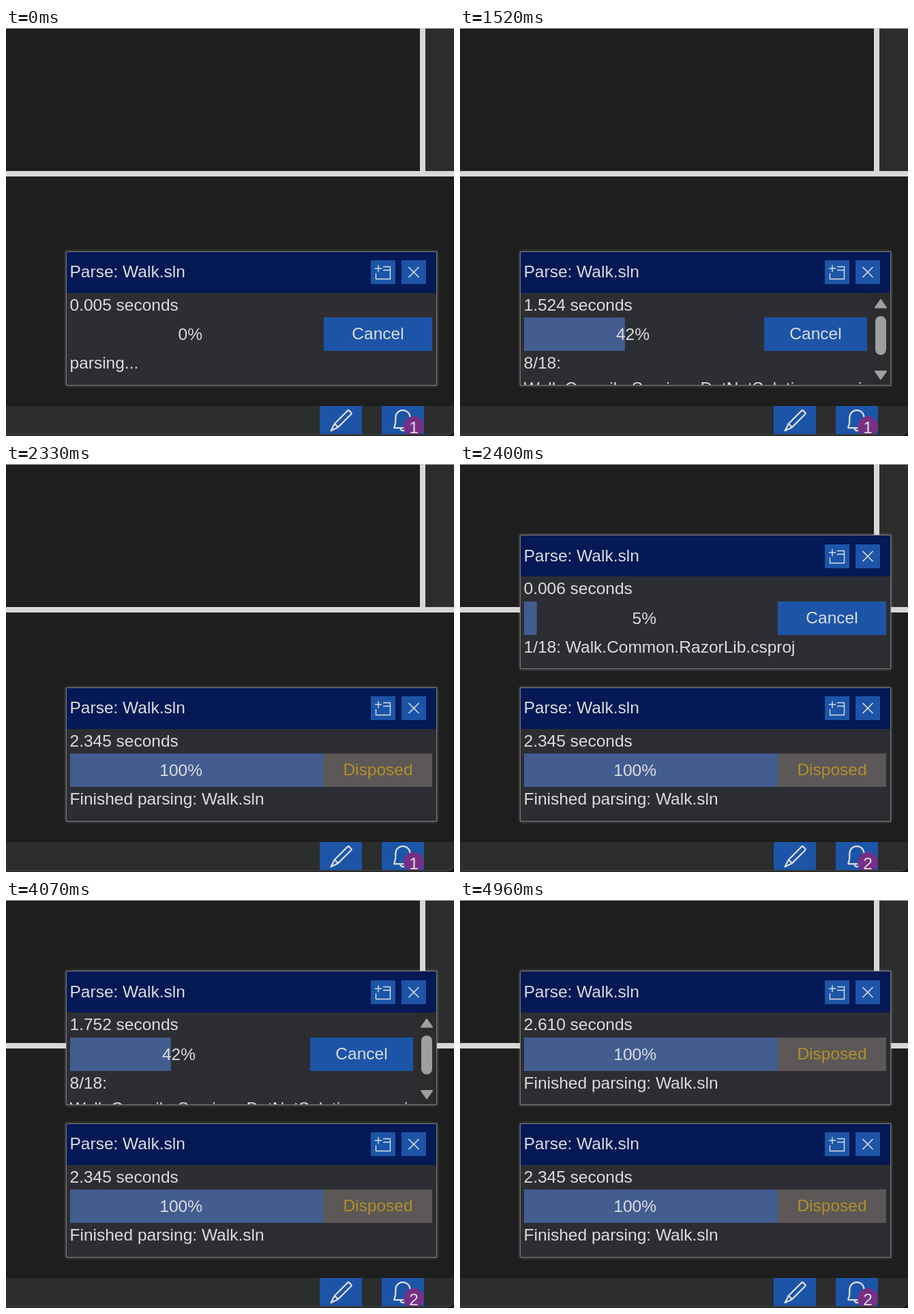
Recreate the animation shown at these times as an HTML page with a canvas. Size 657 by 599 pixels, loop 5550 ms.

```html
<!DOCTYPE html>
<html lang="en">
<head>
<meta charset="utf-8">
<title>Solution parse progress</title>
<style>
html, body { margin: 0; width: 100%; height: 100%; overflow: hidden; background: #1e1e1e; }
canvas { display: block; }
</style>
</head>
<body>
<canvas id="stage" width="657" height="599"></canvas>
<script>
const ctx = document.getElementById('stage').getContext('2d');
const LOOP = 5550;
const FONT = '24.5px "Liberation Sans", Arial, sans-serif';
const TEXT = '#dcdcdc', BLUE = '#1c55a8', SPLIT = '#d8d8d8';

const projects = {
  1: 'Common.RazorLib',
  2: 'TextEditor.RazorLib',
  3: 'Extensions.CompilerServices',
  4: 'CompilerServices.Xml',
  5: 'CompilerServices.Css',
  8: 'CompilerServices.DotNetSolution',
  10: 'CompilerServices.Razor',
  11: 'Ide.RazorLib',
  14: 'CompilerServices.Json',
  16: 'Extensions.DotNet'
};
const DONE = 19;

// [time shown, elapsed seconds, step]
const lowerRun = [
  [0, 0.005, 0], [70, 0.006, 1], [530, 0.533, 2], [990, 0.991, 3], [1190, 1.195, 5],
  [1520, 1.524, 8], [1590, 1.590, 10], [1660, 1.655, 11],
  [1930, 1.934, 14], [2000, 1.996, 16], [2330, 2.345, DONE]
];
const upperRun = [
  [2400, 0.006, 1], [2880, 0.521, 2], [3480, 1.126, 3], [3670, 1.312, 4], [3740, 1.380, 5],
  [4070, 1.752, 8], [4140, 1.815, 10], [4210, 1.877, 11],
  [4540, 2.205, 14], [4610, 2.262, 16], [4960, 2.610, DONE]
];

// Box edges and row positions snap to pixels separately
const lowerPos = { box: 328, row: 0 };
const upperPos = { box: 104, row: -223 };

const pencil = new Path2D('M1.7 14.3 L3.9 9.9 L12 1.8 Q12.5 1.3 13 1.8 L14.2 3 Q14.7 3.5 14.2 4 L6.1 12.1 Z M3.9 9.9 L6.1 12.1');
const bell = new Path2D('M2.6 12.5 L3.07 10.7 C3.35 9.9 3.48 9 3.48 8.2 V6.1 A4.5 4.6 0 0 1 12.5 6.1 V8.2 C12.5 9 12.63 9.9 12.9 10.7 L13.4 12.5 Z M6.5 12.8 a1.5 1.5 0 0 0 3 0');
const newWindow = new Path2D('M546 348 V358.5 M541 353 H551 M553 350.5 H563.5 V368.5 H542.5 V360 M553 355.5 H563.5');
const cross = new Path2D('M590.5 351 L605.5 366 M605.5 351 L590.5 366');

function rect(x, y, w, h, color) {
  ctx.fillStyle = color;
  ctx.fillRect(x, y, w, h);
}

function text(s, x, y, color = TEXT, align = 'left') {
  ctx.fillStyle = color;
  ctx.textAlign = align;
  ctx.fillText(s, x, y);
}

function stroke(path, width) {
  ctx.strokeStyle = TEXT;
  ctx.lineWidth = width;
  ctx.stroke(path);
}

function icon(path, x, y) {
  ctx.save();
  ctx.translate(x, y);
  ctx.scale(2.36, 2.36);
  ctx.lineJoin = 'round';
  stroke(path, 0.95);
  ctx.restore();
}

function background() {
  rect(0, 0, 657, 599, '#1e1e1e');
  rect(615, 0, 42, 210, '#2c2d2d');
  rect(0, 0, 657, 1, '#b4b4b4');
  rect(607, 0, 8, 210, SPLIT);
  rect(0, 210, 657, 8, SPLIT);
}

function statusBar(count) {
  rect(0, 555, 657, 44, '#2c2d2d');
  rect(460, 555, 62, 41, BLUE);
  rect(551, 555, 62, 41, BLUE);
  icon(pencil, 472.6, 557.6);
  icon(bell, 563.1, 557.6);
  ctx.save();
  ctx.beginPath();
  ctx.rect(551, 555, 62, 41);
  ctx.clip();
  ctx.fillStyle = '#763086';
  ctx.beginPath();
  ctx.arc(598, 585, 15, 0, Math.PI * 2);
  ctx.fill();
  text(count, 598, 595, TEXT, 'center');
  ctx.restore();
  // window edge with its rounded corner
  ctx.fillStyle = '#151515';
  ctx.fill(new Path2D('M0 598 H645 Q654 598 657 591 V599 H0 Z'));
  ctx.strokeStyle = '#4c4c4c';
  ctx.lineWidth = 1;
  ctx.stroke(new Path2D('M0 597.5 H645 Q653 597.5 657 591'));
}

function scrollbar(top) {
  ctx.save();
  ctx.translate(0, top);
  rect(603, 61, 28, 135, '#2c2c2c');
  ctx.fillStyle = ctx.strokeStyle = '#9f9f9f';
  ctx.lineWidth = 2;
  ctx.lineJoin = 'round';
  for (const d of ['M617 71 L625 82.5 H609 Z', 'M617 187.5 L625 176 H609 Z']) {
    const arrow = new Path2D(d);
    ctx.fill(arrow);
    ctx.stroke(arrow);
  }
  ctx.beginPath();
  ctx.roundRect(609, 95, 16, 57, 8);
  ctx.fill();
  ctx.restore();
}

function panel(pos, [, seconds, step]) {
  const top = pos.box, dy = pos.row;
  const done = step === DONE, wraps = step === 8;
  const right = wraps ? 597 : 625;
  const left = wraps ? 446 : 466;
  const percent = Math.round(step / DONE * 100);

  ctx.save();
  ctx.shadowColor = 'rgba(190,190,190,0.55)';
  ctx.shadowBlur = 4;
  rect(88, top, 544, 197, '#77777a');
  ctx.restore();
  rect(89, top + 1, 542, 195, '#2d2e33');
  rect(89, top + 1, 542, 60, '#041955');

  ctx.save();
  ctx.beginPath();
  ctx.rect(89, top + 1, 542, 195);
  ctx.clip();
  text('Parse: Walk.sln', 93.5, 366 + dy);
  rect(535, 341 + dy, 36, 35, BLUE);
  rect(580, 341 + dy, 36, 35, BLUE);
  ctx.save();
  ctx.translate(0, dy);
  stroke(newWindow, 1.4);
  stroke(cross, 1.7);
  ctx.restore();

  text(seconds.toFixed(3) + ' seconds', 93.5, top + 87);
  rect(94, 425 + dy, (left - 94) * percent / 100, 49, '#435d91');
  text(percent + '%', (94 + left) / 2 + 8, 458 + dy, TEXT, 'right');
  rect(left, 425 + dy, right - left, 49, done ? '#5b5857' : BLUE);
  text(done ? 'Disposed' : 'Cancel', (left + right) / 2, 457 + dy, done ? '#b28f2b' : TEXT, 'center');

  const name = 'Walk.' + projects[step] + '.csproj';
  const line = 500 + dy;
  if (done) text('Finished parsing: Walk.sln', 93.5, line);
  else if (!step) text('parsing...', 93.5, line);
  else if (wraps) {
    text(step + '/18:', 93.5, line);
    text(name, 93.5, line + 37);
    scrollbar(top);
  } else text(step + '/18: ' + name, 93.5, line);
  ctx.restore();
}

const stateAt = (run, t) => run.findLast(s => s[0] <= t);

function draw(now) {
  const t = now % LOOP;
  ctx.font = FONT;
  ctx.textBaseline = 'alphabetic';
  const upper = stateAt(upperRun, t);
  background();
  statusBar(upper ? 2 : 1);
  panel(lowerPos, stateAt(lowerRun, t));
  if (upper) panel(upperPos, upper);
}

const start = performance.now();
function tick() {
  draw(performance.now() - start);
  requestAnimationFrame(tick);
}
tick();
</script>
</body>
</html>
```
